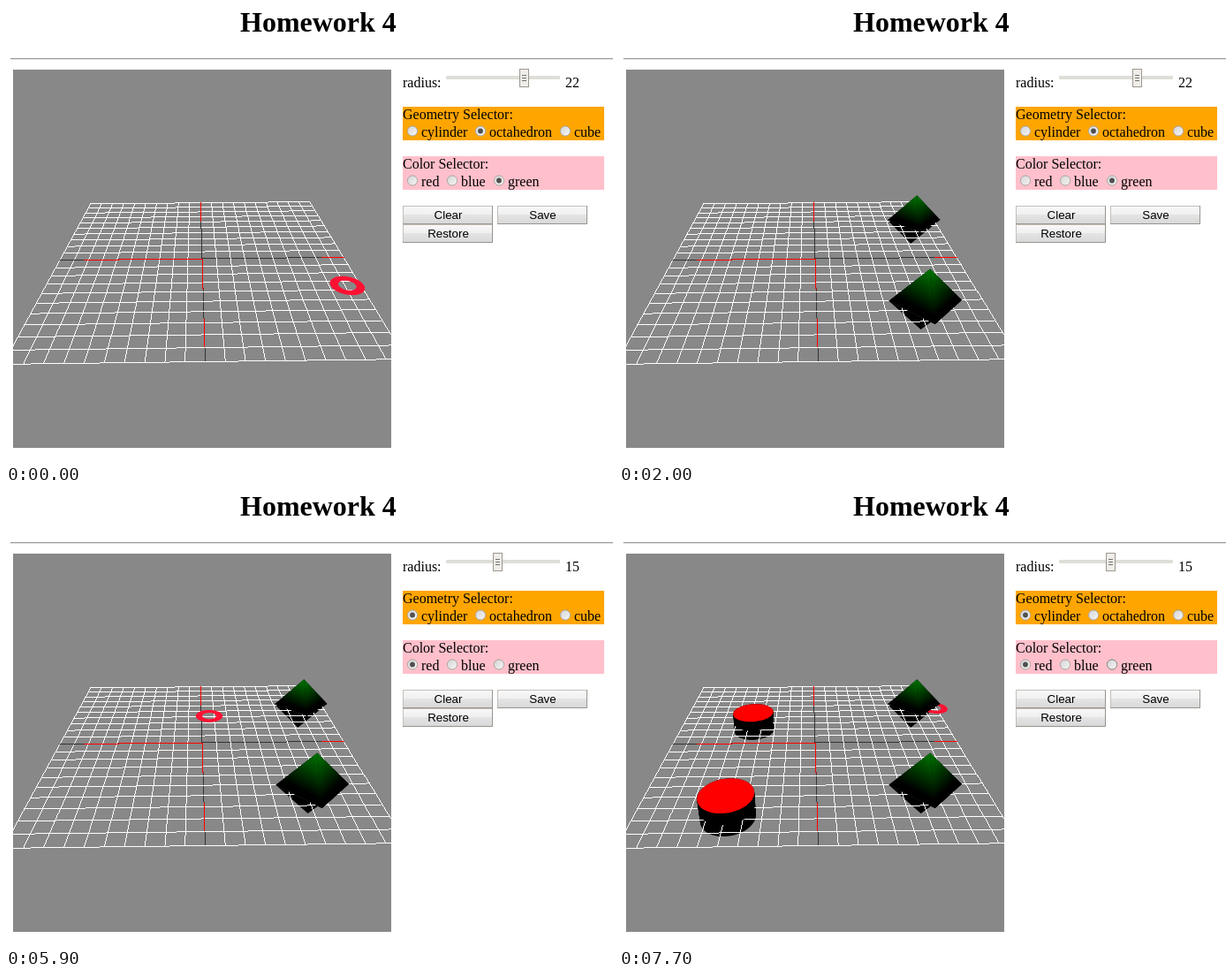
These frames come from a looping animation (687 px wide and 516 px high, 8 s). An HTML page with a canvas:

```html
<!DOCTYPE html>
<html lang="en">
<head>
<meta charset="utf-8">
<title>Homework 4</title>
<style>
  html, body { margin: 0; width: 100%; height: 100%; overflow: hidden; background: #fff; }
  canvas, svg { position: absolute; left: 0; top: 0; }
  text { font: 16px "Liberation Serif", "Times New Roman", serif; }
  .title { font-size: 32px; font-weight: bold; }
  .button text { font: 13.33px "Liberation Sans", Arial, sans-serif; text-anchor: middle; }
</style>
</head>
<body>
<canvas id="scene" width="687" height="516"></canvas>
<svg id="page" width="687" height="516">
  <defs>
    <linearGradient id="face" x2="0" y2="1">
      <stop stop-color="#f8f8f8"/><stop offset=".45" stop-color="#f0f0f0"/>
      <stop offset=".5" stop-color="#e4e4e4"/><stop offset="1" stop-color="#d8d8d8"/>
    </linearGradient>
    <linearGradient id="dial" x2="1" y2="1">
      <stop stop-color="#d4d4d4"/><stop offset="1" stop-color="#f6f6f6"/>
    </linearGradient>
  </defs>
  <text class="title" x="265" y="29">Homework 4</text>
  <path d="M5 59.5H687" stroke="#9a9a9a"/>
  <path d="M5 60.5H687" stroke="#e6e6e6"/>
  <text x="449" y="92">radius:</text>
  <rect x="498" y="79" width="129" height="4" rx="1" fill="#deded8"/>
  <g id="thumb">
    <rect x=".5" y="71.5" width="10" height="20" fill="#efede8" stroke="#9c978f"/>
    <path d="M3 78.5h5m-5 3h5m-5 3h5" stroke="#77736d"/>
  </g>
  <text id="value" x="633" y="92">22</text>
  <rect x="449" y="114" width="228" height="38" fill="#ffa500"/>
  <text x="449" y="128">Geometry Selector:</text>
  <rect x="449" y="170" width="228" height="38" fill="#ffc0cb"/>
  <text x="449" y="184">Color Selector:</text>
</svg>
<script>
const page = document.getElementById('page');
const thumb = document.getElementById('thumb');
const value = document.getElementById('value');
const ctx = document.getElementById('scene').getContext('2d');
const LOOP = 8000, STEP = 100;

// Form controls
function addGroup(markup) {
  const g = document.createElementNS('http://www.w3.org/2000/svg', 'g');
  g.innerHTML = markup;
  page.append(g);
  return g;
}

function addRadio(label, x, y) {
  const g = addGroup(`<circle cx="${x}" cy="${y}" r="5.6" fill="url(#dial)" stroke="#aaa6a0"/>
    <circle cx="${x}" cy="${y}" r="2.9" fill="#505050"/>
    <text x="${x + 10}" y="${y + 6.5}">${label}</text>`);
  const [ring, dot] = g.children;
  return (on, hover, press) => {
    dot.style.display = on ? '' : 'none';
    ring.style.stroke = hover ? '#85817c' : '';
    ring.style.fill = press ? '#cbcbcb' : '';
  };
}

function addButton(label, x, y) {
  addGroup(`<rect x="${x + .5}" y="${y + .5}" width="101" height="20" fill="url(#face)" stroke="#c4beb8"/>
    <path d="M${x} ${y + 20.5}h101.5v-20.5" fill="none" stroke="#9b948e"/>
    <text x="${x + 51.5}" y="${y + 15}">${label}</text>`).setAttribute('class', 'button');
}

const cylinder = addRadio('cylinder', 460, 141.5);
const octahedron = addRadio('octahedron', 537, 141.5);
const cube = addRadio('cube', 633, 141.5);
const red = addRadio('red', 460, 197.5);
const blue = addRadio('blue', 505, 197.5);
const green = addRadio('green', 558, 197.5);
addButton('Clear', 449, 226);
addButton('Save', 556, 226);
addButton('Restore', 449, 247);

// Camera: the ground spans -1 to 1 in u and v, h is the height above it
function project(u, v, h = 0) {
  const w = 1 + .003 * u - .296 * v - .155 * h;
  return [222 + (160.5 * u + 2.45 * v + 1.4 * h) / w,
          286 + (-1.7 * u + 82 * v - 139.7 * h) / w];
}

function makeGrid() {
  const canvas = document.createElement('canvas');
  canvas.width = 687;
  canvas.height = 516;
  const g = canvas.getContext('2d');
  // Hard-edged line, one pixel per step
  function line([x, y], [x2, y2], color) {
    const n = Math.ceil(Math.max(Math.abs(x2 - x), Math.abs(y2 - y)));
    g.fillStyle = color;
    for (let i = 0; i <= n; i++)
      g.fillRect(Math.floor(x + (x2 - x) * i / n), Math.floor(y + (y2 - y) * i / n), 1, 1);
  }
  const across = (v, color, from = -1, to = 1) => line(project(from, v), project(to, v), color);
  const along = (u, color, from = -1, to = 1) => line(project(u, from), project(u, to), color);
  for (let i = -10; i <= 10; i++) {
    across(i / 10, i ? '#fff' : '#333');
    along(i / 10, i ? '#fff' : '#333');
  }
  for (const [from, to] of [[-.83, 0], [.845, 1]]) across(0, '#f00', from, to);
  for (const [from, to] of [[-1, -.61], [0, .37], [.67, .89]]) along(0, '#f00', from, to);
  return canvas;
}
const grid = makeGrid();

function fill(color, ...outlines) {
  ctx.beginPath();
  for (const points of outlines) {
    points.forEach((p, i) => i ? ctx.lineTo(...p) : ctx.moveTo(...p));
    ctx.closePath();
  }
  ctx.fillStyle = color;
  ctx.fill('evenodd');
}

const circle = (u, v, r, h) => Array.from({ length: 48 }, (_, i) =>
  project(u + r * Math.cos(i * Math.PI / 24), v + r * Math.sin(i * Math.PI / 24), h));

// Each solid has a part under the ground and a part above it
function makeOctahedron(u, v, r, from) {
  const left = project(u - r, v), right = project(u + r, v), front = project(u, v + r);
  const apex = project(u, v, r), bottom = project(u, v, -r);
  function shadedFace(p, q) {
    const dx = q[0] - p[0], dy = q[1] - p[1];
    const k = ((apex[0] - p[0]) * dx + (apex[1] - p[1]) * dy) / (dx * dx + dy * dy);
    const shade = ctx.createLinearGradient(p[0] + k * dx, p[1] + k * dy, ...apex);
    shade.addColorStop(.15, '#000');
    shade.addColorStop(1, '#007800');
    fill(shade, [apex, p, q]);
  }
  return {
    u, v, from,
    lower: () => fill('#000', [left, front, right, bottom]),
    upper() {
      fill('#000', [apex, left, front, right]);
      shadedFace(left, front);
      shadedFace(front, right);
    }
  };
}

function makeCylinder(u, v, r, from) {
  const stack = (low, high) => {
    for (let i = 0; i <= 12; i++) fill('#000', circle(u, v, r, low + (high - low) * i / 12));
  };
  return {
    u, v, from,
    lower: () => stack(-r / 2, 0),
    upper() {
      stack(0, r / 2);
      fill('#f00', circle(u, v, r, r / 2));
    }
  };
}

const solids = [
  makeOctahedron(.834, -.615, .22, 2000),
  makeOctahedron(.655, .504, .22, 1000),
  makeCylinder(-.469, -.333, .152, 6200),
  makeCylinder(-.504, .686, .156, 6800)
];
const [farGreen, nearGreen, farRed, nearRed] = solids.map(s => [s.u, s.v]);

// Pointer ring: slows down along a curve bent towards "via"
const ringStart = [.915, .349];
const ringMoves = [
  { from: 300, steps: 6, via: [.09, -.81], to: nearGreen },
  { from: 1300, steps: 5, via: [.745, -.06], to: farGreen },
  { from: 2400, steps: 2, via: [.738, -.45], to: [1.003, -.46] },
  { from: 5800, steps: 5, via: [.27, -.475], to: farRed },
  { from: 6500, steps: 4, via: [-.624, .197], to: nearRed },
  { from: 7000, steps: 4, via: [-.6, .943], to: [.984, -.541] }
];

function ringPlace(t) {
  let place = ringStart;
  for (const { from, steps, via, to } of ringMoves) {
    if (t < from) break;
    const done = Math.min(1, (Math.floor((t - from) / STEP) + 1) / steps);
    const s = 1 - (1 - done) ** 2;
    place = place.map((a, i) => (1 - s) ** 2 * a + 2 * s * (1 - s) * via[i] + s * s * to[i]);
  }
  return place;
}

function drawScene(t) {
  const shown = solids.filter(s => t >= s.from);
  const place = ringPlace(t);
  const drawRing = () => fill('#ff1133', circle(...place, .106), circle(...place, .055));
  const ringInFront = t >= 2400 && t < 5900;
  ctx.save();
  ctx.beginPath();
  ctx.rect(8, 72, 428, 428);
  ctx.clip();
  ctx.fillStyle = '#888';
  ctx.fillRect(8, 72, 428, 428);
  shown.forEach(s => s.lower());
  ctx.drawImage(grid, 0, 0);
  if (!ringInFront) drawRing();
  shown.forEach(s => s.upper());
  if (ringInFront) drawRing();
  ctx.restore();
}

function drawControls(t) {
  const within = (from, to) => t >= from && t < to;
  const round = t >= 3800, isRed = t >= 5500;
  cylinder(round, within(3500, 3900), within(3700, 3800));
  octahedron(!round);
  cube(false);
  red(isRed, within(5300, 5500), within(5400, 5500));
  blue(false);
  green(!isRed, t >= 7700);
  thumb.setAttribute('transform', `translate(${t < 4500 ? 581 : 551})`);
  value.textContent = t < 4600 ? 22 : 15;
}

const start = performance.now();
function frame() {
  const t = (performance.now() - start) % LOOP;
  drawScene(t);
  drawControls(t);
  requestAnimationFrame(frame);
}
frame();
</script>
</body>
</html>
```
